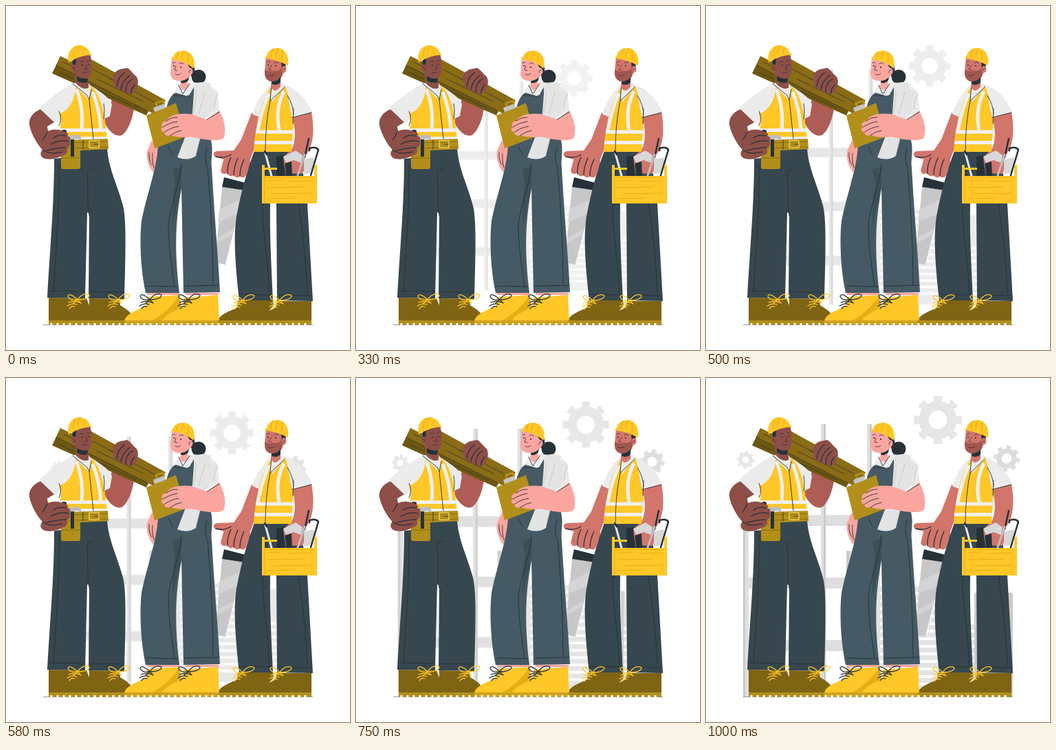
Write an HTML page that moves like this. It is 500x500 px and loops after 1040 ms.

```html
<!DOCTYPE html>
<html lang="en">
<head>
<meta charset="utf-8">
<title>Builders</title>
<style>
html, body { margin: 0; width: 100%; height: 100%; overflow: hidden; background: #fff; }
svg { display: block; width: 100vw; height: 100vh; }
.y { fill: #ffc727; }
.w { fill: #ebebeb; }
.navy { fill: #37474f; }
.denim { fill: #455a64; }
.dark { fill: #263238; }
.wood { fill: #7f6414; }
.gold { fill: #b28f1b; }
.s1 { fill: #8d4f48; }
.s2 { fill: #faa69f; }
.s3 { fill: #d2756b; }
.ln { fill: none; stroke: #263238; stroke-width: .9; stroke-linecap: round; stroke-linejoin: round; }
.rib { fill: none; stroke: #e0a80d; stroke-width: .9; stroke-linecap: round; }
.band { fill: none; stroke: #f0f0f0; stroke-width: 5; }
.lace { fill: none; stroke: #ffc727; stroke-width: 1.3; stroke-linecap: round; }
.gear { fill: none; stroke: #e6e6e6; }
</style>
</head>
<body>
<svg viewBox="0 0 500 500">
<defs>
  <g id="gear">
    <circle r="20.5" stroke-width="14"/>
    <circle r="30.5" stroke-width="9" pathLength="16" stroke-dasharray="1 1" stroke-dashoffset=".5"/>
  </g>
  <path id="laces" d="M0 0C5 -8 12 -10 17 -7C17 -2 8 0 0 0C-7 -8 -14 -9 -14 -5C-12 0 -6 1 0 0L5 5M0 0L-7 6M3 4Q-6 1 -13 4M-1 7Q-8 4 -15 9M-4 10Q-9 8 -12 13"/>
</defs>

<g id="back">
  <g class="gear">
    <use href="#gear" transform="translate(337 61)"/>
    <use href="#gear" transform="translate(437 117) rotate(8) scale(.54)" stroke="#dcdcdc"/>
    <use href="#gear" transform="translate(57.500 119) rotate(5) scale(.37)"/>
  </g>
  <path fill="#dedede" d="M54 199H240V215H54ZM54 290H240V306H54ZM54 381H240V397H54Z"/>
  <path fill="#e0e0e0" d="M54 205h8v258h-8zM167 67h7v396h-7zM234 67h7v396h-7z"/>
  <path fill="#cacaca" d="M54 205h3v258h-3zM171 67h3v396h-3zM238 67h3v396h-3z"/>
  <path fill="#e3e3e3" d="M204 251H253V303H382V358H390V312H446V463H204Z"/>
  <path fill="#cbcbcb" d="M204 251h5v212h-5zM390 312h4v151h-4zM439 312h7v151h-7z"/>
  <path id="slats" fill="none" stroke="#fff" stroke-width="4"/>
</g>

<path d="M54 463.500H446" stroke="#263238" stroke-width=".5"/>

<!-- man with planks -->
<g>
  <path fill="#ae5d56" d="M154 136L187 126C189 150 180 181 168 188C158 191 147 180 141 165Z"/>
  <path fill="#6e5710" d="M79 73L215 137L204 159L67 98Z"/>
  <path fill="#8a6c15" d="M79 73L100 83L112 71L232 137L219 159L205 152L73 86Z"/>
  <path class="ln" d="M73 86L205 152M84 82L98 88M126 92L180 120M132 106L200 139M150 105L216 140M78 97L98 106M130 121L190 148" style="stroke-width:.7"/>
  <path class="s1" d="M156 111C153 100 159 94 166 92L176 90C181 92 184 98 190 103C194 110 191 120 186 126L181 128C175 126 169 125 165 121C160 120 157 116 156 111Z"/>
  <path class="ln" d="M161 117C162 107 166 102 172 97M167 121C169 111 174 105 180 101M174 125C174 116 178 109 184 106M182 127C181 122 184 118 187 115" style="stroke-width:1.300"/>

  <path class="navy" d="M79 207L147 205C148 234 162 260 170 290C175 309 174 355 172 426L120 425L121 301L118 300L115 425L60 424C64 350 70 290 70 222L80 221Z"/>
  <path class="ln" d="M77 229C78 290 73 350 69 414M62 414L114 415M122 415L171 416M127 237L118 240C120 263 117 282 121 305"/>

  <path class="s1" d="M50 150C37 156 33 164 34 173C37 187 45 200 52 208L67 190C62 184 60 179 60 175L72 168Z"/>
  <path class="w" d="M48 148C62 135 80 122 98 112L122 115C140 126 153 136 154 143L151 160L143 164L146 194L76 193L80 163L72 171Z"/>
  <path class="y" d="M101 117L121 137L123 116C136 126 139 143 143 160L147 194H74C79 180 82 169 77 156C88 155 101 139 101 117Z"/>
  <path class="w" d="M99 112L121 136L124 119L119 110Z"/>
  <path class="band" d="M102 121C109 137 112 158 110 180M126 125C133 143 137 163 138 180"/>
  <path class="band" d="M76 180.500H145M74 192.500H147" stroke-width="4"/>
  <path class="ln" d="M121 136L127 193M142 142Q144 154 142 164M77 153Q82 163 77 174M97 113L118 130L121 136L124 121"/>
  <path class="s1" d="M97 78L122 68C126 86 126 99 120 104L120 113V119Q112 123 102 113Z"/>
  <path class="dark" d="M96 80L102 76L101 87L98 91ZM103 102Q112 107 119 105L118 111Q109 113 103 108Z"/>
  <ellipse class="s1" cx="99" cy="90" rx="4" ry="5"/>
  <path class="ln" d="M107 82Q110 79 113 81M118 80L121 79M116 86L118 92L114 92M111 97Q115 99 118 96M97 89Q100 89 100 93" style="stroke-width:.7"/>
  <circle class="dark" cx="111" cy="86" r="1"/><circle class="dark" cx="120" cy="85" r=".9"/>
  <path class="y" d="M91 82C88 67 96 57 107 57C116 58 121 63 122 69L126 71Q108 71 91 82Z"/>
  <path class="rib" d="M98 73Q97 64 103 59M104 70Q103 62 109 58M112 69Q112 63 115 61"/>

  <path class="gold" d="M80 220V209L84 195L148 193L149 208L108 210V234Q108 237 105 237H83Q80 237 80 234Z"/>
  <path class="ln" d="M84 199L148 197M90 207L148 205M80 221H108" style="stroke:#7f6414;stroke-width:.8"/>
  <path class="ln" d="M121 196H135V206H121Z" style="stroke:#f0ce55;stroke-width:1.500"/><path class="ln" d="M128 201H134M112 195V208"/>
  <path fill="#bdbdbd" d="M91 188L106 187Q110 190 109 195Q105 192 100 193L99 196H94Z"/>
  <path class="dark" d="M94 194H99V219H94ZM80 182Q83 178 88 181L87 211H81Z"/>
  <path class="s1" d="M60 183C67 178 77 179 86 183C91 185 92 188 88 189C94 189 95 194 92 197C95 202 92 205 88 206C91 212 88 216 83 217C75 221 67 224 57 222C49 220 49 212 53 209L50 204C52 195 56 190 60 183Z"/>
  <path class="ln" d="M88 189C79 187 73 188 69 192M92 197C81 194 72 197 65 201M88 206C78 205 69 208 59 210M53 209C63 216 72 214 82 212M60 183Q57 190 53 195" style="stroke-width:1.200"/>
  <path class="wood" d="M62 424L117 425L121 435C132 440 143 446 146 458H62ZM121 425L165 426L166 435C176 441 184 446 187 458H141Q135 441 121 436Z"/>
  <g class="lace"><use href="#laces" x="104" y="427"/><use href="#laces" x="163" y="427"/></g>
</g>

<!-- man with saw and toolbox -->
<g>
  <path fill="#c7c7c7" d="M314 263L346 268L319 376L304 373Z"/>
  <path fill="#d4d4d4" d="M310 296L341 281L337 302L308 314ZM307 337L331 324L329 333L306 345Z"/>
  <path fill="none" stroke="#fff" stroke-width="2" stroke-dasharray="1.500 1.500" d="M346.500 268L319.500 376"/>
  <path class="dark" d="M317 249L348 257L347 268L314 263ZM345 227L366 230L365 236L346 234Z"/>
  <path class="navy" d="M362 208L417 209C432 232 438 267 438 287L446 429L394 428L393 287H384C383 335 386 382 388 429L339 428C334 383 330 337 335 306C342 269 350 240 362 208Z"/>
  <path class="ln" d="M376 232C383 255 371 280 373 309C376 343 381 378 383 418M339 419L387 420M395 420L445 421M425 287Q436 357 438 418"/>
  <path class="s3" d="M357 155L369 160C367 187 362 207 355 223L348 230L320 224L303 219Q299 213 306 211L331 210L342 194Z"/>
  <path fill="none" stroke="#d2756b" stroke-width="10.500" stroke-linecap="round" d="M322 222L317.500 239M331 223L327 242M341 224L336 244M350 226L344 244"/>
  <path class="ln" d="M327 220Q321 232 322 244M337 221Q331 234 331 246M346 223Q340 235 340 247M305 219Q317 222 327 216" style="stroke-width:1.300"/>
  <path class="s3" d="M416 159L444 154C449 181 447 207 433 220L438 232L430 244L407 243L402 221L416 207C422 193 420 177 416 159Z"/>
  <path class="w" d="M358 157C363 141 374 122 388 112L405 114C424 121 438 137 445 154L417 162L415 207H363L367 161Z"/>
  <path class="y" d="M385 118C374 134 363 164 360 212H415L418 165C410 147 412 128 405 115L387 140Z"/>
  <path class="w" d="M386 114L384 138L405 119L403 112Z"/>
  <path class="band" d="M382 127Q371 153 366 181M404 124C393 145 394 164 397 181"/>
  <path class="band" d="M363 183H417M361 198.500H416"/>
  <path class="ln" d="M384 138Q377 171 377 211M386 114L384 138L405 118M416 162L444 155M418 149L417 171M409 130Q418 145 418 158"/>
  <path class="s3" d="M378 74L403 78L405 90Q406 99 399 100L399 117Q391 128 385 118L386 108Q376 107 376 95Z"/>
  <path fill="#a0574f" d="M376 93Q383 96 390 94Q397 96 401 89L402 100Q398 112 386 110Q376 108 376 98Z"/>
  <path class="dark" d="M400 81L407 83L406 94L401 92ZM386 110Q396 109 399 103L399 111Q393 117 386 113Z"/>
  <ellipse class="s3" cx="404" cy="92" rx="3.500" ry="5"/>
  <path class="ln" d="M379 82Q381 79 383 81M390 83Q393 80 396 83M386 86L382 92L386 93M381 101Q385 103 390 100M402 94Q403 90 405 91" style="stroke-width:.7"/>
  <circle class="dark" cx="381" cy="86" r=".9"/><circle class="dark" cx="392" cy="87" r="1"/>
  <path class="y" d="M376 76L379 72C381 64 388 61 395 61C406 62 412 72 410 87Q395 78 376 76Z"/>
  <path class="rib" d="M385 74Q385 66 389 62M392 75Q392 66 396 62M401 78Q402 70 401 65"/>
  <path class="dark" d="M393 219L403 217L405 247H393ZM405 229L415 226L416 247H408Z"/>
  <path class="ln" d="M377 214L386 247" style="stroke:#e8e8e8;stroke-width:3"/>
  <path fill="#d8d8d8" d="M403 219L421 210L431 217L429 228L418 224L407 228ZM433 223L447 220L450 228L442 243L433 245Z"/>
  <path class="ln" d="M441 210V207Q451 204 454 209L443 246M440 193L434 220" style="stroke-width:2.500"/>
  <path class="ln" d="M434 216L424 246" style="stroke:#bdbdbd;stroke-width:3"/>
  <path class="ln" d="M376 211L379 216" style="stroke-width:2.500"/>
  <path class="y" d="M372 231H376V247H448V231H452V287H372ZM376 235H394V238H376Z"/>
  <path class="ln" d="M376 247V286M380 254L402 253M411 255L446 254M380 264L432 263M389 273L446 272M380 280L419 279M378 249H447" style="stroke:#dda411;stroke-width:.7"/>
  <path class="wood" d="M337 428H388L389 435L370 458H308C310 448 325 444 336 438ZM394 429H444V458H365C370 447 382 444 392 438Z"/>
  <g class="lace"><use href="#laces" x="344" y="428"/><use href="#laces" x="398" y="428"/></g>
</g>

<!-- woman with clipboard -->
<g>
  <path class="s2" d="M212 195L223 206L220 228L214 242C207 234 203 219 205 211Z"/>
  <path class="ln" d="M208 213Q207 224 212 231M213 214Q212 226 215 235"/>
  <circle class="dark" cx="280" cy="103" r="10.500"/>
  <path class="w" d="M250 115L269 111C287 111 300 116 307 124L311 154L273 169L236 160Q237 135 250 115Z"/>
  <path class="denim" d="M247 126L266 130L273 118L275 155L298 195C302 211 297 224 299 235C303 306 309 371 311 416L258 417L255 265C247 310 244 348 252 417L203 417C193 370 195 319 198 307C206 270 218 240 221 205L235 194L234 145Q237 134 243 128Z"/>
  <path class="navy" d="M242 238L256 232L254 268Q248 292 242 318Q242 278 246 258Z" opacity=".6"/>
  <path class="ln" d="M236 204L242 216M255 229C253 258 239 290 236 317C236 350 241 378 245 407M205 407L250 408M259 407L310 406M292 206Q287 226 293 235Q301 330 301 406M244 130L267 131"/>
  <path class="s2" d="M241 74L268 78L272 92Q271 102 264 105L265 117Q258 127 253 117L254 109Q240 109 239 99Z"/>
  <path class="w" d="M251 115L257 128L267 113L271 120L263 131L247 126Z"/>
  <path class="ln" d="M251 115L257 128L267 113"/>
  <path class="dark" d="M264 80L273 86Q277 99 269 102Q270 91 265 87ZM254 109Q262 108 266 103L265 108Q259 114 254 111Z"/>
  <ellipse class="s2" cx="268" cy="95" rx="3.500" ry="5"/>
  <path class="ln" d="M242 83Q244 81 246 82M252 84Q255 81 258 84M247 87L245 93L249 94M246 99Q250 102 254 98M266 97Q266 92 269 93" style="stroke-width:.8"/>
  <circle class="dark" cx="244" cy="87" r="1"/><circle class="dark" cx="254" cy="89" r="1.100"/>
  <path class="y" d="M240 78L243 74C244 67 252 65 258 65C270 66 276 76 273 91Q258 78 240 78Z"/>
  <path class="rib" d="M248 77Q248 69 252 66M255 77Q255 69 259 66M264 81Q266 74 264 69"/>
  <path fill="#e4e4e4" d="M274 113Q287 108 299 113L294 120L308 126L303 149L289 164L276 218Q264 226 249 220L262 186L271 155Z"/>
  <path class="ln" d="M276 123Q277 140 272 156M289 125Q284 144 280 157M282 192L276 215M308 128Q302 139 303 149" style="stroke:#c7c7c7"/>
  <path class="gold" d="M204 159L247 141L261 190L216 207Z"/>
  <path fill="#c7c7c7" d="M214 148L230 142L232 148L216 154Z"/>
  <path d="M219 146L218 141L228 138L230 143" fill="none" stroke="#b28f1b" stroke-width="3"/>
  <path class="s2" d="M310 152C318 166 320 180 317 191C311 198 290 195 269 190C257 192 247 190 239 188C232 190 229 185 231 183C225 183 224 178 228 176C224 172 228 168 233 167C237 159 250 155 269 157L292 165Z"/>
  <path class="ln" d="M228 176Q239 169 249 168M231 183Q241 176 251 175M239 188Q247 182 255 181M233 167Q241 161 249 162M292 165L310 154"/>
  <path class="s2" d="M205 417H252V420H205ZM261 417H309V420H261Z"/>
  <path class="y" d="M205 423L252 420L256 458H172C174 447 190 443 204 435Z"/>
  <path fill="#e5ae16" d="M252 421L255 436L228 458H210Q234 447 252 421Z"/>
  <path class="y" d="M258 424L308 420L310 458H227C230 448 246 444 258 435Z"/>
  <g class="ln" style="stroke-width:1.300"><use href="#laces" x="209" y="427"/><use href="#laces" x="265" y="427"/></g>
</g>

<path fill="#b18f1c" d="M62 457H172V463.500H62ZM308 457H444V463.500H308Z"/>
<path fill="#cfa31f" d="M172 457H308V463.500H172Z"/>
<path d="M66 462.500H443" stroke="#fff" stroke-width="3.500" stroke-dasharray="0 9" stroke-linecap="round"/>
</svg>
<script>
const LOOP = 1040, STEP = 41.6;
const back = document.getElementById('back');

let slats = '';
for (let y = 313; y < 455; y += 11) slats += y < 358 ? `M253 ${y}H382` : `M253 ${y}H390M394 ${y}H439`;
document.getElementById('slats').setAttribute('d', slats);

// Ease-out, cubic-bezier(0, 0, .58, 1)
function easeOut(x) {
  let lo = 0, hi = 1;
  for (let i = 0; i < 20; i++) {
    const u = (lo + hi) / 2;
    if (1.74 * u * u - .74 * u ** 3 < x) lo = u; else hi = u;
  }
  return 3 * lo * lo - 2 * lo ** 3;
}

const start = performance.now();
function draw() {
  const t = (performance.now() - start) % LOOP;
  const k = Math.min(24, Math.floor((t + 5) / STEP));
  const e = easeOut(Math.min(1, (k + 1) / 24.2));
  const s = .5 + e / 2;
  back.setAttribute('transform', `translate(250 250) scale(${s}) translate(-250 -250)`);
  back.setAttribute('opacity', k ? e : 0);
  requestAnimationFrame(draw);
}
draw();
</script>
</body>
</html>
```
